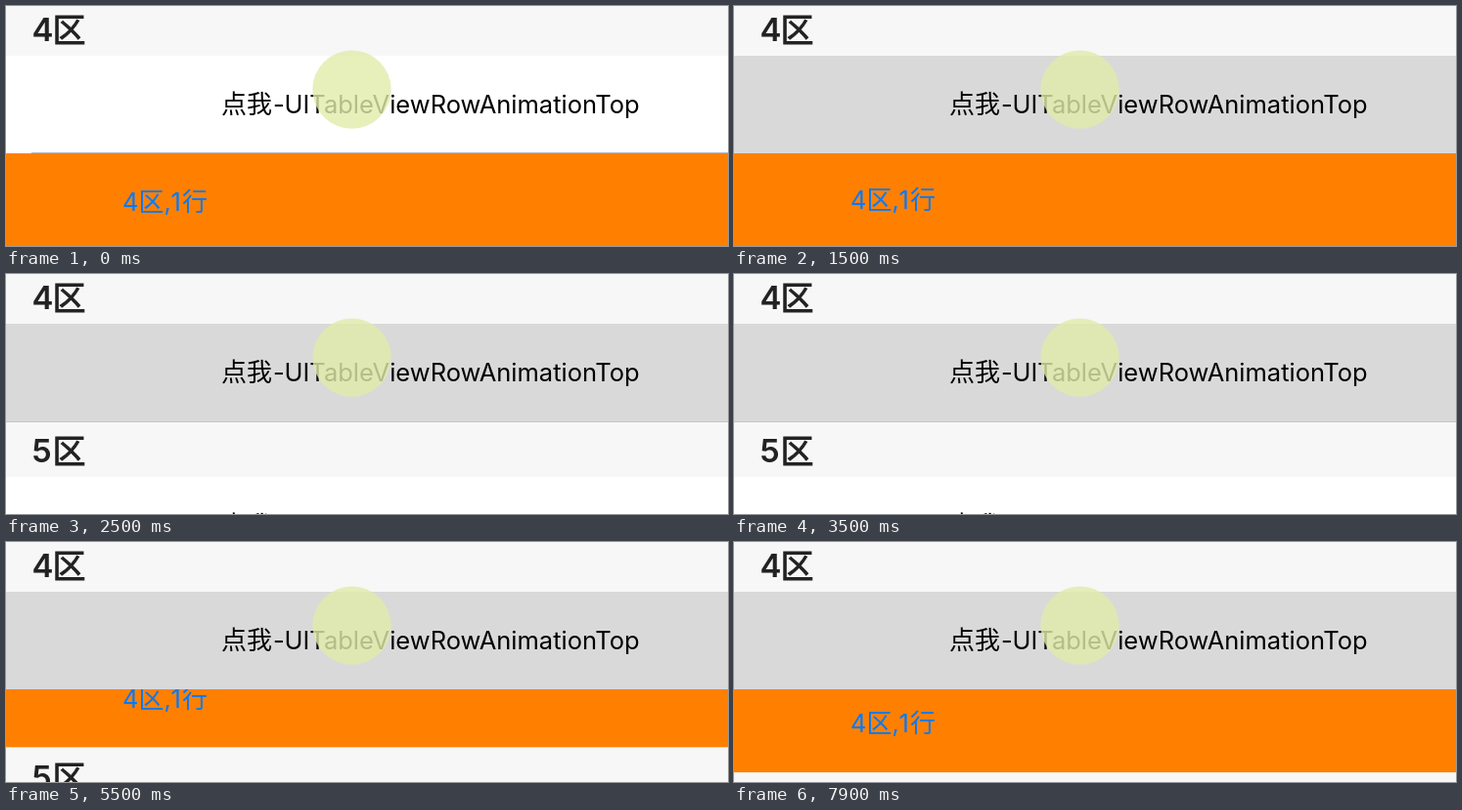
Write an HTML page that moves like this. It is 738 px wide and 246 px high and loops after 8000 ms.

```html
<!DOCTYPE html>
<html lang="zh-CN">
<head>
<meta charset="utf-8">
<title>Table row animation</title>
<style>
  html, body { margin: 0; width: 100%; height: 100%; overflow: hidden; background: #fff; }
  svg { display: block; width: 100vw; height: 100vh; }
  text { font-family: Inter, "Noto Sans CJK SC", "Noto Sans CJK", sans-serif; font-size: 25.5px; }
  .han { font-family: "Noto Sans CJK SC", "Noto Sans CJK", sans-serif; font-size: 26px; }
  .head { font-size: 33px; font-weight: 600; fill: #222; }
  .head .han { font-size: 34px; font-weight: 400; stroke: #222; stroke-width: .9px; }
  .link { fill: #007aff; }
</style>
</head>
<body>
<svg viewBox="0 0 738 246" lang="zh-CN">
  <defs>
    <clipPath id="below"><rect y="151" width="738" height="95"/></clipPath>
  </defs>
  <rect width="738" height="246" fill="#fff"/>
  <rect width="738" height="51" fill="#f7f7f7"/>
  <text class="head" y="36"><tspan x="26.4">4</tspan><tspan class="han" x="47.4" dy="1">区</tspan></text>
  <rect id="row" y="51" width="738" height="100"/>
  <text y="110"><tspan class="han" x="220">点我</tspan><tspan x="273">-</tspan><tspan x="284.5">UITableViewRowAnimationTop</tspan></text>

  <g clip-path="url(#below)">
    <g id="cell">
      <rect y="151" width="738" height="100" fill="#ff8000"/>
      <text class="link" y="210"><tspan x="119">4</tspan><tspan class="han" x="135.5">区</tspan><tspan x="161.5">,</tspan><tspan x="168.5">1</tspan><tspan class="han" x="180">行</tspan></text>
    </g>
    <g id="next">
      <rect y="151" width="738" height="57" fill="#f7f7f7"/>
      <rect y="208" width="738" height="100" fill="#fff"/>
      <text class="head" y="193"><tspan x="26.4">5</tspan><tspan class="han" x="47.4" dy="1">区</tspan></text>
      <text y="267"><tspan class="han" x="220">点我</tspan></text>
    </g>
  </g>
  <rect id="inset" x="26" y="150" width="712" height="1" fill="#b4b4b6"/>
  <rect id="edge" y="151" width="738" height="1"/>
  <circle cx="353.5" cy="85.6" r="40.2" fill="#e2ecab" fill-opacity=".8"/>
</svg>
<script>
  const LOOP = 8000, STEP = 200, SLIDE = 1090, CELL = 100;
  const TAP = 1500, CLOSE = 1405, OPEN = 4888, CLOSE_AGAIN = 7627;
  const $ = id => document.getElementById(id);
  const row = $('row'), cell = $('cell'), next = $('next'), inset = $('inset'), edge = $('edge');

  // Ease in and out over one slide, from 0 to 1
  function slide(t, start) {
    const x = Math.min(1, Math.max(0, (t - start) / SLIDE));
    return (1 - Math.cos(Math.PI * x)) / 2;
  }
  const shift = (el, y) => el.setAttribute('transform', `translate(0 ${y})`);
  const show = (el, on) => el.setAttribute('visibility', on ? 'visible' : 'hidden');

  function draw(time) {
    // The screen refreshes in steps, half a step after each even mark
    const t = Math.floor((time - STEP / 2) / STEP) * STEP + STEP / 2;
    const h = CELL * (1 - slide(t, CLOSE) + slide(t, OPEN) - slide(t, CLOSE_AGAIN));
    const tapped = t >= TAP;
    row.setAttribute('fill', tapped ? '#d9d9d9' : '#fff');
    shift(cell, h - CELL);
    shift(next, h);
    show(inset, !tapped);
    show(edge, h < 1);
    edge.setAttribute('fill', t < OPEN ? '#c4c4c6' : '#c8925a');
  }

  const start = performance.now();
  function tick() {
    draw((performance.now() - start) % LOOP);
    requestAnimationFrame(tick);
  }
  tick();
</script>
</body>
</html>
```
